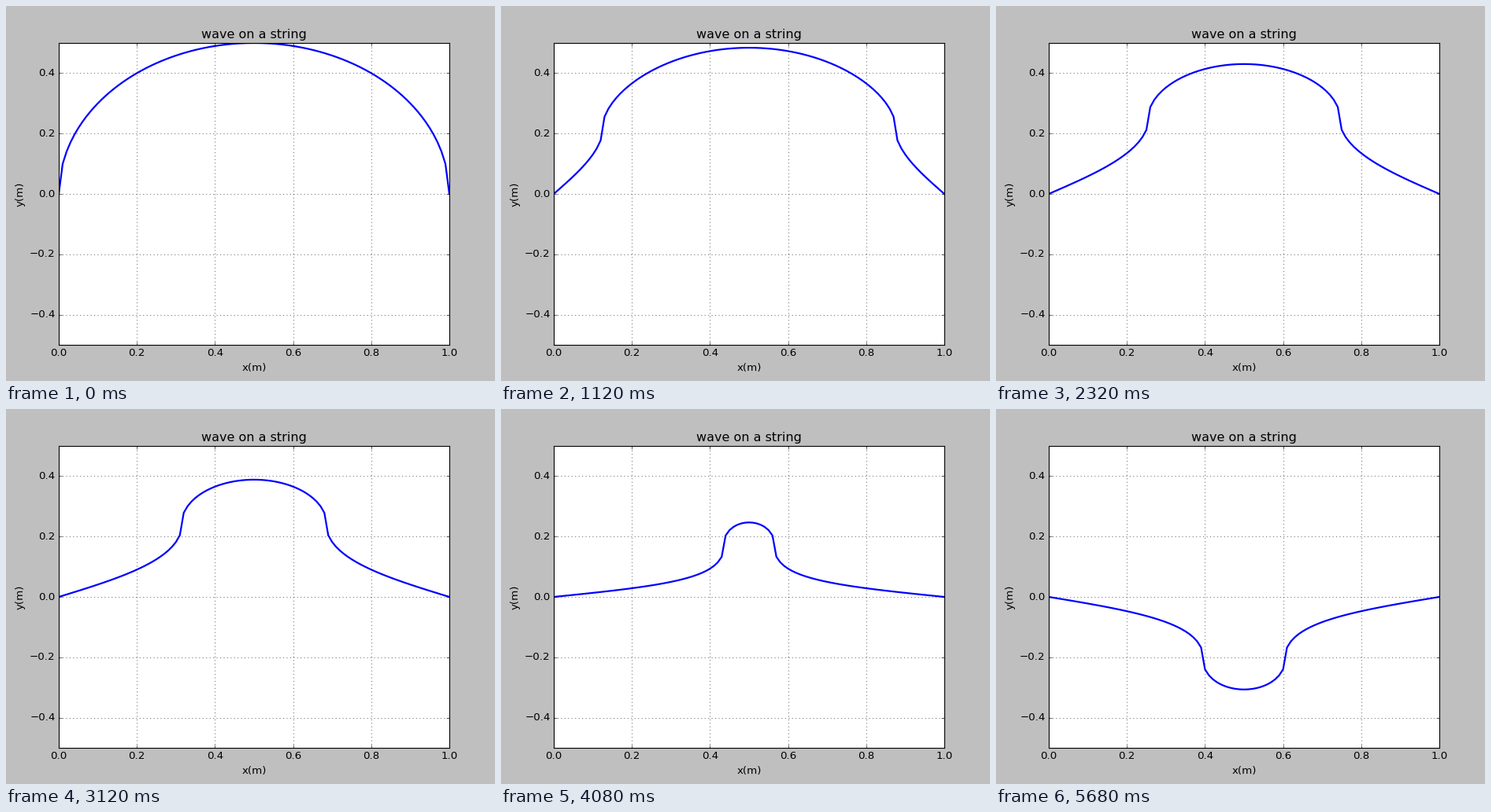
A matplotlib script for the animation above (5.84 s loop, 621x477 px).

```python
import numpy as np
import matplotlib.pyplot as plt
from matplotlib.animation import FuncAnimation

W, H, DPI = 621, 477, 80
TICKS, INTERVAL = 73, 80

plt.style.use("classic")
plt.rcParams.update({
    "font.family": "DejaVu Sans",
    "figure.dpi": DPI,
    "savefig.dpi": "figure",
    "savefig.facecolor": "auto",
    "savefig.edgecolor": "auto",
})

# Uneven playback: clock tick -> redraw count -> simulation step
TICK = [0, 14, 15, 29, 39, 40, 43, 45, 57, 71]
REDRAW = [0, 9, 10, 19, 25, 26, 28, 29, 38, 46]
STEP = [0, 12, 16, 25, 31, 32, 34, 35, 52, 60]

x = np.linspace(0, 1, 101)


def simulate(steps):
    """Leapfrog wave equation with fixed ends, released from rest."""
    prev = np.sqrt(x * (1 - x))
    states = [prev.copy()]
    for _ in range(steps):
        now = states[-1]
        new = np.zeros_like(now)
        new[1:-1] = now[2:] + now[:-2] - prev[1:-1]
        prev = now
        states.append(new)
    return states


def step_at(tick):
    redraw = np.floor(np.interp(tick, TICK, REDRAW) + 1e-9)
    return int(round(np.interp(redraw, REDRAW, STEP)))


states = simulate(STEP[-1])

fig = plt.figure(figsize=(W / DPI, H / DPI), dpi=DPI, facecolor="0.75")
# A hair below the pixel edge, so centred labels round downwards
ax = fig.add_axes([67 / W, 45.99 / H, 496 / W, 384 / H])
ax.set(xlim=(0, 1), ylim=(-0.5, 0.5), xlabel="x(m)", ylabel="y(m)",
       title="wave on a string",
       xticks=np.arange(6) / 5, yticks=np.arange(-2, 3) / 5)
ax.grid(True)
line, = ax.plot(x, states[0], "b", lw=2)


def update(tick):
    line.set_ydata(states[step_at(tick)])
    return line,


anim = FuncAnimation(fig, update, frames=TICKS, interval=INTERVAL,
                     repeat=True, repeat_delay=0, blit=False)
plt.show()
```
